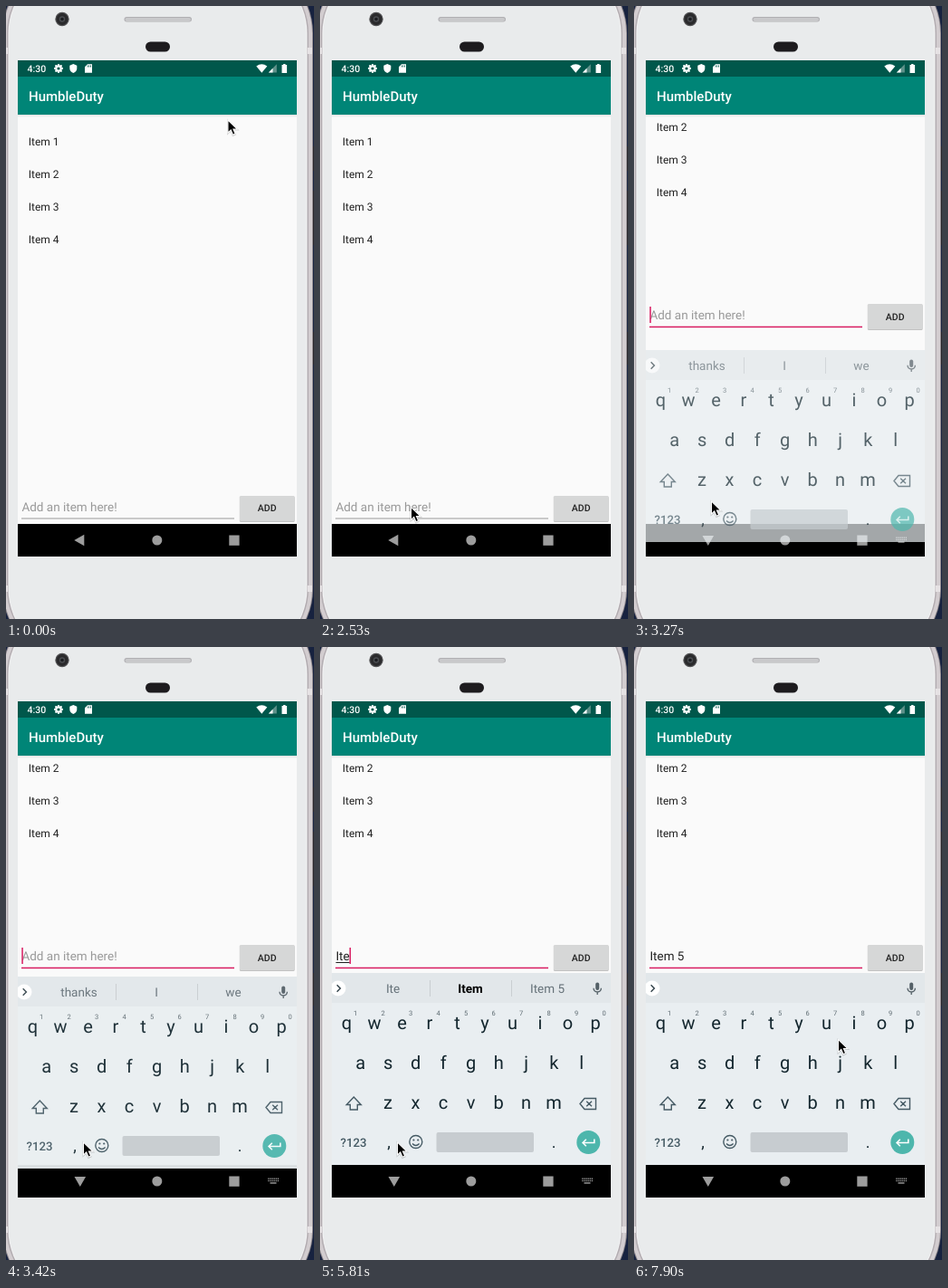
These frames come from a looping animation (340 by 677 pixels, 8 s). An HTML page with a canvas:

```html
<!DOCTYPE html>
<html lang="en">
<head>
<meta charset="utf-8">
<title>To-do list demo</title>
<style>
html, body { margin: 0; width: 100%; height: 100%; overflow: hidden; background: #17223f; }
canvas { display: block; }
</style>
</head>
<body>
<canvas id="stage" width="340" height="677"></canvas>
<script>
const ctx = document.getElementById('stage').getContext('2d');
ctx.textRendering = 'geometricPrecision';
const LOOP = 8000;
const PINK = '#d81b60';
const FIELD_SHIFT = -211.5, LIST_SHIFT = -52.5;

// Each track is a list of [start time, value]; values hold until the next.
const pointerTrack = [
  [0, [244.5, 125.5]], [140, [238, 146]], [290, [190, 270]], [440, [90, 480]], [590, [41, 566]],
  [740, [97, 562]], [890, [98, 562]], [1040, [97, 560]], [1190, [99, 556]], [1340, [100, 553]],
  [2680, [99, 553]], [2830, [93, 551]], [2980, [85, 546.5]],
  [7750, [148, 498]], [7900, [225, 433]]
];
const keyboardTrack = [
  [0, null], [3270, { drop: 20, alpha: 0.7 }], [3420, { drop: 4, alpha: 0.94 }], [3560, { drop: 0, alpha: 1 }]
];
const typedTrack = [[0, ''], [5060, 'I'], [5360, 'It'], [5810, 'Ite'], [6260, 'Item'], [6560, 'Item '], [7450, 'Item 5']];
const caretTrack = [
  [0, false], [2980, true], [3560, false], [4010, true], [4460, false],
  [5060, true], [7000, false], [7450, true], [7900, false]
];
const hintTrack = [
  [0, ['thanks', 'I', 'we']], [5060, ['I’m', 'I', 'In']], [5360, ['It’s', 'It', 'Is']],
  [5810, ['Ite', 'Item', 'Item 5']], [6260, ['Items', 'Item', 'Item’s']],
  [6560, ['4', '5', '6']], [7450, []]
];
const at = (track, t) => track.reduce((value, [start, next]) => t >= start ? next : value, track[0][1]);

function rect(x, y, w, h, color) {
  ctx.fillStyle = color;
  ctx.fillRect(x, y, w, h);
}
function roundRect(x, y, w, h, r, color) {
  ctx.beginPath();
  ctx.roundRect(x, y, w, h, r);
  ctx.fillStyle = color;
  ctx.fill();
}
function disc(x, y, r, color) {
  ctx.beginPath();
  ctx.arc(x, y, r, 0, Math.PI * 2);
  ctx.fillStyle = color;
  ctx.fill();
}
function shape(d, x, y, fill, stroke, width = 1) {
  const path = new Path2D(d);
  ctx.save();
  ctx.translate(x, y);
  if (stroke) {
    ctx.strokeStyle = stroke;
    ctx.lineWidth = width;
    ctx.stroke(path);
  }
  if (fill) {
    ctx.fillStyle = fill;
    ctx.fill(path);
  }
  ctx.restore();
}
function text(str, x, y, size, color, align = 'left', weight = 400) {
  ctx.font = `${weight} ${size}px Roboto, sans-serif`;
  ctx.textAlign = align;
  ctx.fillStyle = color;
  ctx.fillText(str, x, y);
}

function drawPhone() {
  rect(0, 0, 340, 677, '#17223f');
  for (const [y, h] of [[155, 27], [204, 60], [360, 36]]) rect(338, y, 2, h, '#25242a');
  // The body is wider than the stage on the left, centred on the screen.
  const layers = [[0, '#8b858a'], [1, '#d3cdd0'], [5, '#b3adb1'], [6.5, '#f2f2f3'], [7.5, '#e9ebec']];
  for (const [inset, color] of layers) {
    roundRect(-4 + inset, -50 + inset, 343 - inset * 2, 774 - inset * 2, 80 - inset, color);
  }
  for (const y of [46, 640]) {
    rect(0, y, 2, 7, '#e6e2e4');
    rect(333, y, 5, 7, '#e6e2e4');
  }

  disc(62, 14.5, 7.7, '#505052');
  disc(62, 14.5, 6.5, '#2a2a2c');
  disc(62, 14.5, 3.2, '#4a4c50');
  disc(62, 14.5, 1.8, '#1b1c20');
  roundRect(130.5, 12, 74.5, 5.5, 2.7, '#b0afb2');
  roundRect(131.5, 13, 72.5, 4, 2, '#c9c9cb');
  roundRect(154, 39.5, 27, 11, 5.5, '#1d1b1e');
}

function drawStatusBar() {
  rect(13, 60, 308, 18, '#00574b');
  text('4:30', 23.5, 73, 10.5, '#fff', 'left', 500);
  for (let i = 0; i < 8; i++) {
    const a = i * Math.PI / 4;
    disc(58 + Math.cos(a) * 3.9, 69 + Math.sin(a) * 3.9, 1.15, '#fff');
  }
  disc(58, 69, 3.7, '#fff');
  disc(58, 69, 1.6, '#00574b');
  shape('M0-5L4-3.3V0C4 2.5 2 4.4 0 5C-2 4.4-4 2.5-4 0V-3.3Z', 74.3, 69, '#fff');
  shape('M-1-4.7H4V4.7H-4V-1.8Z', 91, 69, '#fff');
  for (const x of [89.7, 91.4, 93.1]) rect(x, 65.5, 0.8, 2, '#00574b');
  shape('M0 4.7L-6-2.5Q0-7 6-2.5Z', 282.3, 69, '#fff');
  shape('M4.3-4.7V4.5H-4.7Z', 294.5, 69, '#5f928b');
  shape('M0-.3V4.5H-4.7Z', 294.5, 69, '#fff');
  shape('M-1.2-5H1.2V-4H2.8V5H-2.8V-4H-1.2Z', 307.3, 69, '#fff');
}

function drawList(raised) {
  rect(13, 120, 308, 452, '#fafafa');
  const shift = raised ? LIST_SHIFT : 0;
  for (let i = 1; i <= 4; i++) text(`Item ${i}`, 24.8, 118.4 + i * 36 + shift, 12, '#212121');
  const shade = ctx.createLinearGradient(0, 120, 0, 123);
  shade.addColorStop(0, 'rgba(0,0,0,.1)');
  shade.addColorStop(1, 'rgba(0,0,0,0)');
  rect(13, 120, 308, 3, shade);
  rect(13, 78, 308, 42, '#008577');
  text('HumbleDuty', 25, 105, 15, '#fff', 'left', 500);
}

function drawField(t, raised) {
  const dy = raised ? FIELD_SHIFT : 0;
  const typed = at(typedTrack, t);
  const baseline = 557.7 + dy;
  text(typed || 'Add an item here!', 17.4, baseline, 13.5, typed ? '#212121' : '#999');
  const width = typed ? ctx.measureText(typed).width : 0;
  if (typed && !/\s/.test(typed)) rect(17.5, Math.round(baseline + 1.3), width, 1, '#212121');
  if (t >= 2980) rect(17, 565.2 + dy, 235, 1.5, PINK);
  else rect(17, 565.5, 235, 1, '#9a9a9a');
  if (at(caretTrack, t)) rect(17.3 + width, Math.round(543.5 + dy), 1.5, 18, PINK);

  const top = Math.round(540.7 + dy);
  roundRect(257.5, top, 61.5, 29, 2, '#e5e5e5');
  roundRect(258, top + 0.5, 60.5, 28.5, 1.5, '#c2c2c2');
  roundRect(258, top, 60.5, 28, 1.5, '#d6d7d7');
  text('ADD', 288.2, 558.2 + dy, 10.5, '#212121', 'center', 500);
}

function drawKeyRow(letters, x, baseline) {
  [...letters].forEach((c, i) => text(c, x + i * 30.5, baseline, 20, '#13262e', 'center'));
}

function drawSuggestions(t) {
  rect(13, 360, 308, 33, '#e2e7ea');
  disc(20, 377, 8.5, '#fff');
  shape('M-1.8-3.7L1.9 0L-1.8 3.7', 20.5, 377, null, '#37474f', 1.5);
  const words = at(hintTrack, t);
  words.forEach((word, i) => {
    const best = i === 1 && t >= 5060;
    text(word, [80.5, 166, 251][i], 382, 13.5, best ? '#000' : '#657178', 'center', best ? 700 : 400);
  });
  if (words.length) for (const x of [121, 211]) rect(x, 368, 1, 18, '#c9ced1');
  roundRect(304.2, 370.5, 4, 8.5, 2, '#546067');
  shape('M-4.2-.2Q-4 4 0 4Q4 4 4.2-.2M0 4V7', 306.2, 377, null, '#546067', 1.3);
}

function drawKeyboard(t, { drop, alpha }) {
  ctx.save();
  ctx.beginPath();
  ctx.rect(13, 360, 308, 248);
  ctx.clip();
  ctx.globalAlpha = alpha;
  ctx.translate(0, drop);
  rect(13, 393, 308, 179, '#e9eef1');
  drawSuggestions(t);
  drawKeyRow('qwertyuiop', 29.5, 422);
  [...'1234567890'].forEach((c, i) => text(c, 39 + i * 30.5, 407, 7.5, '#5d6a71', 'center'));
  drawKeyRow('asdfghjkl', 44.7, 466);
  drawKeyRow('zxcvbnm', 75, 510);
  shape('M0-7.5L8 1H4V6.5H-4V1H-8Z', 37.3, 504.5, null, '#455a64', 1.4);
  shape('M-9 0L-4-6H8.5V6H-4ZM-1.8-2.8L4 2.8M4-2.8L-1.8 2.8', 296, 504.5, null, '#455a64', 1.4);
  text('?123', 37, 552, 13.2, '#455a64', 'center', 500);
  text(',', 76, 553, 18, '#13262e', 'center');
  text('.', 258, 553, 18, '#13262e', 'center');
  shape('M7 0A7 7 0 1 1-7 0A7 7 0 1 1 7 0M-3.8 2Q0 6 3.8 2', 105.8, 546.5, null, '#455a64', 1.4);
  disc(103.4, 544.5, 1.1, '#455a64');
  disc(108.2, 544.5, 1.1, '#455a64');
  roundRect(128.5, 536, 107.5, 22, 2, '#c7ccd0');
  disc(296.3, 547, 13, '#4db6ac');
  shape('M6.5-4V0H-6M-2.5-3.7L-6.2 0L-2.5 3.7', 296.3, 547.5, null, '#fff', 1.6);
  ctx.restore();
}

function drawNavBar(open) {
  const gray = '#9d9d9d';
  rect(13, 572, 308, 36, '#000');
  if (open) shape('M-6.3-5H6.3L0 6Z', 81.8, 590, gray);
  else shape('M5.3-6.2V6.2L-5.7 0Z', 81, 590, gray);
  disc(166.8, 590, 5.5, gray);
  rect(246.3, 584.5, 11.3, 11.3, gray);
  if (!open) return;
  for (let row = 0; row < 2; row++) {
    for (let col = 0; col < 6; col++) rect(289.2 + col * 2.1, 586.5 + row * 2.3, 1.3, 1.4, gray);
  }
  rect(291.5, 591.3, 7, 1.4, gray);
}

function drawPointer([x, y]) {
  const arrow = 'M1 1.8V13.2L3.9 10.5L6.3 16L7.9 15.3L5.6 9.9H9.5Z';
  shape(arrow, x, y + 0.7, null, 'rgba(0,0,0,.15)', 3);
  shape(arrow, x, y, '#000', '#fff', 2);
}

function draw(t) {
  const raised = t >= 3120;
  const keyboard = at(keyboardTrack, t);
  drawPhone();
  drawList(raised);
  drawStatusBar();
  drawField(t, raised);
  drawNavBar(Boolean(keyboard));
  if (keyboard) drawKeyboard(t, keyboard);
  drawPointer(at(pointerTrack, t));
}

function frame() {
  draw(performance.now() % LOOP);
  requestAnimationFrame(frame);
}
frame();
</script>
</body>
</html>
```
